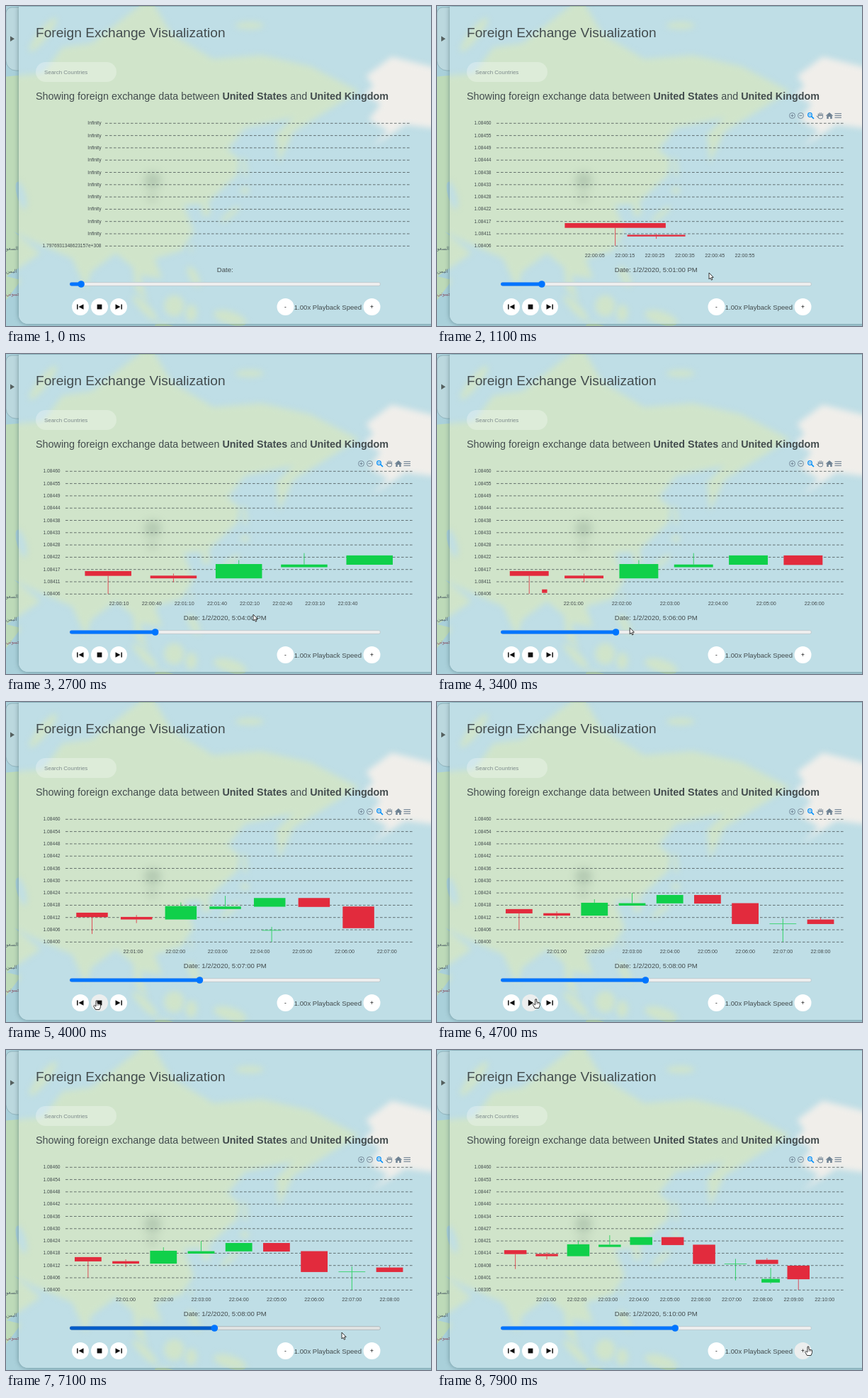
Write an HTML page with a canvas that moves like this. It is 600 px wide and 451 px high and loops after 8000 ms.

```html
<!DOCTYPE html>
<html lang="en">
<head>
<meta charset="utf-8">
<title>Foreign Exchange Visualization</title>
<style>
html, body { margin: 0; width: 100%; height: 100%; overflow: hidden; background: #bfdee6; }
canvas { display: block; width: 600px; height: 451px; }
</style>
</head>
<body>
<canvas id="stage" width="600" height="451"></canvas>
<script>
const W = 600, H = 451, LOOP = 8000;
const c = document.getElementById('stage').getContext('2d');
const RED = '#e22b3d', GREEN = '#10d04a', INK = '#434c4e', TOOL = '#6e8192';
const LEFT = 84, RIGHT = 573, TOP = 165, BASE = 338, MID = 328.7, BTN_Y = 424;

// open, close, then high and low where a wick shows; units of 0.00001 above 1.08400
const prices = [
  [16, 13.9, 16, 6], [14, 12.8, 14.9, 11.1], [12.8, 19.1, 20.8], [17.7, 18.9, 23.9],
  [18.8, 22.9], [22.9, 18.7], [18.9, 8.7], [8.8, 8.9, 11.4, 0],
  [10.9, 8.7, 11.8], [7.8, 0.6, 7.8, -5], [-0.4, 1.9, 8.9, -1.2]
].map(([o, e, hi = Math.max(o, e), lo = Math.min(o, e)]) => [o, e, hi, lo]);

// one update per minute of data, with a pause after the ninth
const STEP = 482, FIRST = 420, PAUSE = 4420, RESUME = 6680;
const updateAt = i => i < 9 ? FIRST + i * STEP : RESUME + (i - 8) * STEP;

// cursor stops: arrival, departure, x, y
const stops = [
  [450, 450, 430, 455], [1050, 1400, 384, 376], [2600, 3100, 349, 367], [3850, 4550, 128, 421],
  [5400, 5800, 282, 394], [6400, 6700, 130, 421], [7080, 7250, 474, 398], [7750, LOOP, 524, 418]
];

const lerp = (a, b, p) => a + (b - a) * p;
const ease = p => 0.5 - Math.cos(Math.PI * Math.max(0, Math.min(1, p))) / 2;
const two = v => String(v).padStart(2, '0');

function label(s, x, y, size, color = INK, align = 'left', weight = '') {
  c.font = `${weight} ${size}px "Liberation Sans", Arial, sans-serif`;
  c.fillStyle = color;
  c.textAlign = align;
  c.fillText(s, x, y);
  return x + c.measureText(s).width;
}
function poly(g, pts, fill) {
  g.beginPath();
  for (const [x, y] of pts) g.lineTo(x, y);
  g.closePath();
  g.fillStyle = fill;
  g.fill();
}
function disc(g, x, y, r, fill) {
  g.beginPath();
  g.arc(x, y, r, 0, 7);
  g.fillStyle = fill;
  g.fill();
}
function ring(x, y, r, color, width) {
  c.beginPath();
  c.arc(x, y, r, 0, 7);
  c.strokeStyle = color;
  c.lineWidth = width;
  c.stroke();
}
function pill(g, x, y, w, h, r, fill) {
  g.beginPath();
  g.roundRect(x, y, w, h, r);
  g.fillStyle = fill;
  g.fill();
}
function line(color, width, x1, y1, x2, y2) {
  c.strokeStyle = color;
  c.lineWidth = width;
  c.beginPath();
  c.moveTo(x1, y1);
  c.lineTo(x2, y2);
  c.stroke();
}
// triangle with its tip at x + d
const arrow = (g, x, y, d, h, fill) => poly(g, [[x, y - h], [x, y + h], [x + d, y]], fill);

// Mercator map: longitude and latitude to the stage
const SCALE = 3.43;
function project([lon, lat]) {
  const m = Math.log(Math.tan(Math.PI / 4 + lat * Math.PI / 360));
  return [385 + (lon - 157) * SCALE, 222 - SCALE * 180 / Math.PI * (m - 1.038)];
}
const asia = [
  [30, 68], [60, 69], [68, 72.5], [80, 73], [104, 77.7], [113, 74], [130, 71], [150, 71.5], [170, 70],
  [190, 66.2], [178, 63], [163, 58.5], [157, 51], [156, 58], [163, 61.5], [143, 59.3], [136, 54.5],
  [141, 52], [140, 48], [128, 40], [129, 36], [126, 35], [125, 39.5], [118, 39], [122, 30], [117, 23],
  [106, 20], [109, 12], [100, 13.5], [103, 1.5], [98, 8], [97, 16.5], [90, 22], [80, 15], [77.5, 8],
  [72, 20], [57, 26], [48, 30], [59, 22], [45, 13], [51, 11.5], [40, -3], [30, -8]
];
const alaska = [[192, 65.6], [196, 67], [193, 68.6], [203.5, 71.3], [225, 69.5], [225, 59], [209, 60], [195, 55], [202, 58.7], [194, 61], [199, 64]];
// islands and lakes: longitude, latitude, half length and width in pixels, tilt
const islands = [
  [60, 74, 30, 7, -0.9], [145, 75, 20, 5, 0], [143, 50, 15, 3, 1.5], [143, 43.5, 6, 5, 0], [137, 36, 17, 4, -0.7],
  [102, 0, 24, 6, 0.8], [114, 1, 14, 15, 0], [121, -2, 8, 12, 0], [110, -7.3, 14, 3, 0.1],
  [122, 13, 16, 6, 1.1], [137, -4, 24, 9, 0.3], [121, 24, 6, 2, 1.5]
];
function drawMap(g, land, water, snow) {
  g.fillStyle = water;
  g.fillRect(-20, -20, W + 40, H + 40);
  poly(g, asia.map(project), land);
  poly(g, alaska.map(project), snow);
  const oval = (color, [lon, lat, a, b, tilt]) => {
    g.beginPath();
    g.ellipse(...project([lon, lat]), a, b, tilt, 0, 7);
    g.fillStyle = color;
    g.fill();
  };
  for (const isle of islands) oval(land, isle);
  oval(water, [51, 42, 20, 6, 1.3]);
}

function makeBackdrop() {
  const cv = document.createElement('canvas');
  cv.width = W;
  cv.height = H;
  const g = cv.getContext('2d');
  drawMap(g, '#bddab8', '#a9d0da', '#efeeea');
  g.font = '7px "Noto Sans", "DejaVu Sans", sans-serif';
  ['السعو', 'اليمن', 'جيبوتي'].forEach((s, i) => {
    g.fillStyle = i < 2 ? '#55666a' : '#8d5a6c';
    g.fillText(s, 0, 344 + i * 32);
  });

  // side tab
  pill(g, 0, 2, 22, 89, [8, 0, 0, 14], '#bbd8de');
  g.strokeStyle = 'rgba(95,130,140,.4)';
  g.stroke();
  arrow(g, 6, 46.3, 6, 3.8, '#55605f');

  // frosted panel
  g.save();
  g.shadowColor = 'rgba(50,85,95,.55)';
  g.shadowBlur = 6;
  pill(g, 18, 1, 620, 447, [0, 0, 0, 13], '#bfdee6');
  g.restore();
  g.save();
  g.clip();
  g.filter = 'blur(4px)';
  drawMap(g, '#d0e4ca', '#bfdee6', '#f0eeea');
  g.filter = 'blur(6px)';
  disc(g, 207, 246, 12, 'rgba(140,165,145,.4)');
  disc(g, 206, 270, 8, 'rgba(150,172,150,.25)');
  g.restore();
  pill(g, 42, 79, 114, 28, 14, 'rgba(255,255,255,.28)');
  return cv;
}
const backdrop = makeBackdrop();

// chart layout for n candles
const lowest = n => n < 8 ? 6 : n < 10 ? 0 : -5;
const spacing = n => (RIGHT - LEFT) / (n + (n < 3 ? -0.075 : n < 6 ? 0.3 : 0.19));
const barWidth = n => n < 3 ? 173 - n * 19 : spacing(n) * 0.71;
const xAt = (n, minute) => MID + (minute - (n - 1) / 2) * spacing(n);

// x, width and the four prices as pixels; new candles grow from the lower left
function pose(i, n) {
  if (i >= n) return [LEFT, 0, BASE, BASE, BASE, BASE];
  const min = lowest(n), k = (BASE - TOP) / (60 - min);
  return [xAt(n, i), barWidth(n), ...prices[i].map(u => BASE - (u - min) * k)];
}

function drawCandles(n, p) {
  for (let i = 0; i < n; i++) {
    const to = pose(i, n);
    const [x, w, open, close, high, low] = pose(i, n - 1).map((v, k) => lerp(v, to[k], p));
    const color = prices[i][1] > prices[i][0] ? GREEN : RED;
    const top = Math.min(open, close), h = Math.max(0.7, Math.abs(open - close));
    c.fillStyle = color;
    c.fillRect(x - w / 2, top, w, h);
    line(color, 0.8, x, high, x, top);
    line(color, 0.8, x, top + h, x, low);
  }
}

function drawAxes(n) {
  const left = n ? LEFT : 140, right = n ? RIGHT + 1 : 570, min = lowest(n);
  for (let k = 0; k <= 10; k++) {
    const y = TOP + 0.3 + k * 17.3;
    c.setLineDash([3.6, 2.4]);
    line(INK, 0.75, left, y, right, y);
    let s = k < 10 ? 'Infinity' : '1.7976931348623157e+308';
    if (n) s = '1.0' + (8400 + Math.ceil(60 - k * (60 - min) / 10 - 0.501));
    label(s, n ? 76.5 : 134.5, y + 2, 6.64, INK, 'right');
  }
  c.setLineDash([]);
  // ticks thin out as the time span grows
  const step = n < 3 ? 10 : n < 4 ? 20 : n < 6 ? 30 : 60;
  const start = n < 2 ? 0 : n < 3 ? 5 : n < 6 ? 10 : 60;
  for (let s = start; s <= (n - 1) * 60; s += step)
    label(`22:${two(Math.floor(s / 60))}:${two(s % 60)}`, xAt(n, s / 60), 353.5, 7.2, INK, 'center');
}

function drawTools() {
  const y = 154.5, blue = '#008ffb';
  for (const x of [501.5, 513.5]) {
    ring(x, y, 4, TOOL, 0.9);
    line(TOOL, 0.9, x - 2, y, x + 2, y);
  }
  line(TOOL, 0.9, 501.5, y - 2, 501.5, y + 2);
  ring(526.5, y - 1, 2.8, blue, 1.2);
  line(blue, 0.8, 525, y - 1, 528, y - 1);
  line(blue, 1.6, 528.6, y + 1, 532, y + 4.4);
  // open hand
  for (let i = 0; i < 4; i++) line(TOOL, 1, 538.4 + i * 2, 155, 538.4 + i * 2, 151.5 - Math.sin(i) * 1.3);
  line(TOOL, 1, 535.8, 154.8, 538.8, 158);
  c.beginPath();
  c.roundRect(538.2, 154, 6.4, 4.8, [0, 0, 2.5, 2.5]);
  c.stroke();
  // house
  poly(c, [[548.7, 154.8], [554, 150], [559.3, 154.8]], TOOL);
  c.fillRect(550.3, 154.5, 2.5, 4.5);
  c.fillRect(555.2, 154.5, 2.5, 4.5);
  c.fillRect(552, 154, 4, 2);
  for (let i = -1; i < 2; i++) line(TOOL, 1.1, 561.5, y + i * 2.8, 571, y + i * 2.8);
}

function drawSlider(minute, hover) {
  const x = 127 + minute * 20.92;
  pill(c, 90, 389.6, 438.5, 4.8, 2.4, hover ? '#e0e3e3' : '#efefef');
  c.strokeStyle = hover ? '#a2adaf' : '#b4c1c4';
  c.lineWidth = 0.7;
  c.stroke();
  pill(c, 90, 389.6, x - 90, 4.8, 2.4, hover ? '#005cc8' : '#0075ff');
  disc(c, x, 392, 4.8, '#0075ff');
}

const buttons = [105, 132, 159, 394.5, 516.5];
const over = (x, p) => p && Math.hypot(p.x - x, p.y - BTN_Y) < 12;

function drawControls(p, paused) {
  for (const x of buttons) disc(c, x, BTN_Y, 12, over(x, p) ? '#eceeee' : '#fff');
  for (const [x, dir] of [[105, -1], [159, 1]]) {
    arrow(c, x - dir * 4.5, BTN_Y, dir * 7, 3.7, '#111');
    c.fillRect(x + dir * 4.2 - 0.75, BTN_Y - 3.5, 1.5, 7);
  }
  if (paused) arrow(c, 128.8, BTN_Y, 7.2, 4.4, '#111');
  else c.fillRect(128.6, BTN_Y - 3.4, 6.8, 6.8);
  label('-', 394.5, 427, 8.4, '#111', 'center');
  label('+', 516.5, 427.2, 8.4, '#111', 'center');
  label('1.00x Playback Speed', 406.8, 428, 9.57);
}

function cursorAt(t) {
  if (t < stops[0][0]) return null;
  const i = stops.findLastIndex(s => s[0] <= t);
  const a = stops[i], b = stops[i + 1] || a;
  const p = ease((t - a[1]) / Math.max(1, b[0] - a[1]));
  return { x: lerp(a[2], b[2], p), y: lerp(a[3], b[3], p) };
}

function drawCursor(p) {
  c.save();
  c.translate(p.x, p.y);
  c.lineJoin = 'round';
  c.lineWidth = 0.9;
  c.strokeStyle = '#222';
  if (buttons.some(x => over(x, p))) {
    poly(c, [[-0.9, 0], [0.9, 0], [1.1, 4], [5.4, 5], [5.6, 8.5], [4, 12.5], [-1.6, 12.5], [-4.4, 7.4], [-3.4, 6.4], [-1.1, 8]], '#fff');
    c.stroke();
    for (const x of [1.2, 3.2]) line('#222', 0.6, x, 4.6, x, 7);
  } else {
    poly(c, [[0, 0], [0, 9], [2, 7.2], [3.4, 10.2], [4.9, 9.5], [3.5, 6.6], [6.2, 6.4]], '#fff');
    c.stroke();
  }
  c.restore();
}

function draw(t) {
  const n = prices.filter((_, i) => t >= updateAt(i)).length;
  const p = cursorAt(t);

  c.drawImage(backdrop, 0, 0);
  label('Foreign Exchange Visualization', 42, 44, 19.14);
  label('Search Countries', 54, 96, 7.95, '#7d8a8b');
  let x = 42;
  for (const [s, weight] of [['Showing foreign exchange data between ', ''], ['United States', 'bold'], [' and ', ''], ['United Kingdom', 'bold']])
    x = label(s, x, 132, 14.36, INK, 'left', weight);

  drawAxes(n);
  if (n) {
    drawCandles(n, ease((t - updateAt(n - 1)) / 350));
    drawTools();
  }
  const date = n ? ` 1/2/2020, 5:${two(n - 1)}:00 PM` : '';
  label('Date:' + date, 309.3, 374.5, 9.57, INK, 'center');
  drawSlider(n - 1, p && Math.abs(p.y - 393) < 7 && p.x > 88 && p.x < 530);
  drawControls(p, t >= PAUSE && t < RESUME);
  if (p) drawCursor(p);
}

const began = performance.now();
function tick() {
  draw((performance.now() - began) % LOOP);
  requestAnimationFrame(tick);
}
tick();
</script>
</body>
</html>
```
